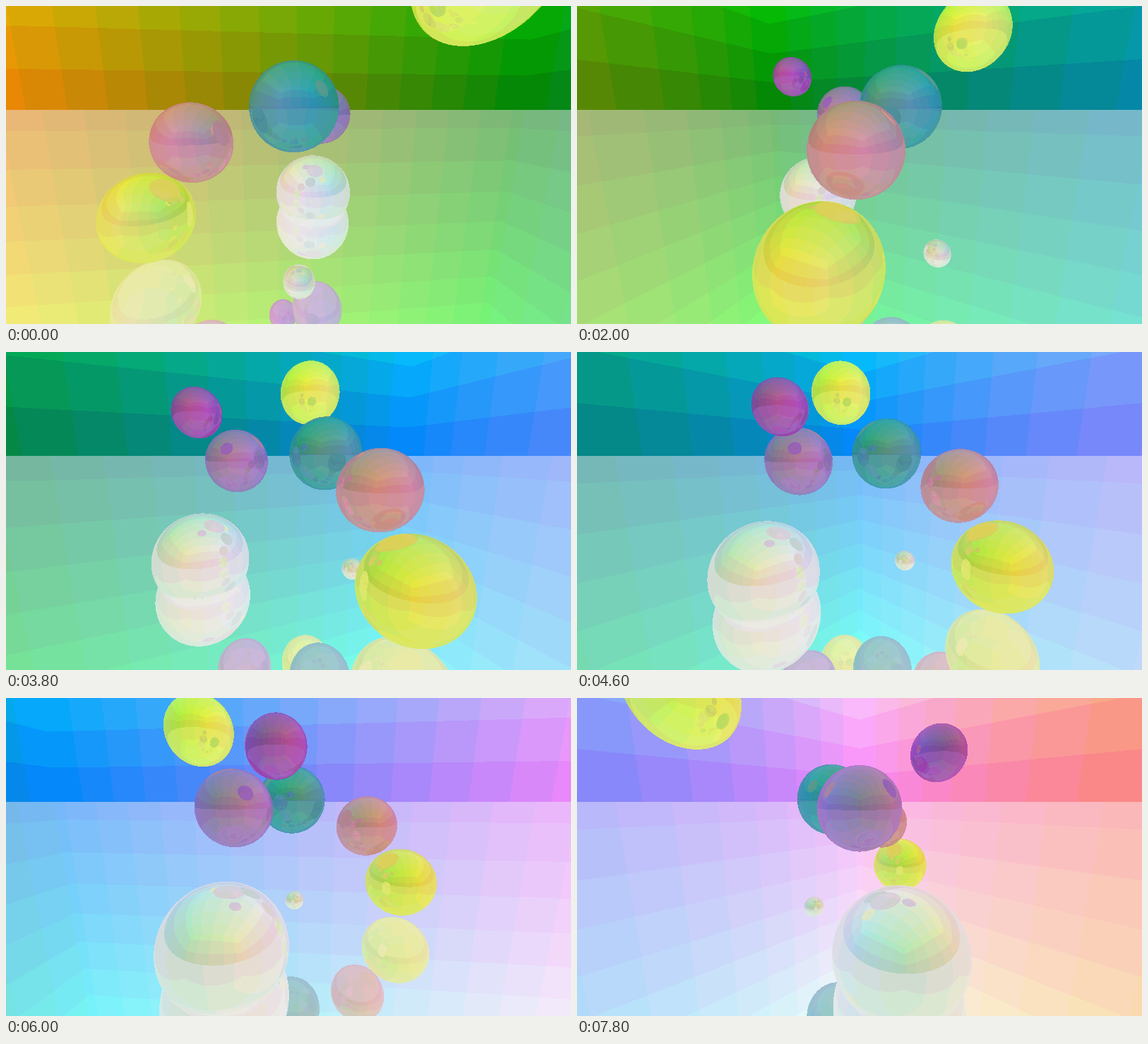
An HTML page with a canvas for the animation above (8000 ms loop, 800 by 450 pixels).

```html
<!DOCTYPE html>
<html lang="en">
<head>
<meta charset="utf-8">
<title>Mirror spheres</title>
<style>
  html, body { margin: 0; width: 100%; height: 100%; overflow: hidden; background: #000; }
  canvas { display: block; width: 800px; height: 450px; }
</style>
</head>
<body>
<canvas id="stage" width="800" height="450"></canvas>
<script>
const W = 800, H = 450, LOOP = 8000, STEP = 200;
const TURN = 2 * Math.PI / 12800;       // camera orbit, radians per ms
const FOCAL = 389.7, PITCH = Math.atan(0.2);
const FLOOR = -0.478;                   // the camera is the origin, one unit from the orbit axis
const MAX_DEPTH = 4;
const ctx = document.getElementById('stage').getContext('2d');

// orbit: distance from the axis; near: time in ms when closest to the camera
const spheres = [
  { orbit: 0.473, near: 2355,  y: -0.326,  radius: 0.137,  color: [177, 183, 62] },
  { orbit: 0.337, near: 2050,  y: -0.097,  radius: 0.1185, color: [160, 103, 116] },
  { orbit: 0.150, near: -220,  y: 0.006,   radius: 0.1345, color: [40, 111, 125] },
  { orbit: 0.215, near: 7800,  y: -0.021,  radius: 0.1185, color: [122, 84, 146] },
  { orbit: 0.302, near: 6200,  y: 0.128,   radius: 0.0745, color: [122, 46, 140] },
  { orbit: 0.528, near: -2170, y: 0.314,   radius: 0.152,  color: [177, 190, 64] },
  { orbit: 0.338, near: 7140,  y: -0.399,  radius: 0.181,  color: [181, 181, 180] },
  { orbit: 0.299, near: -205,  y: FLOOR,   radius: 0.0455, color: [172, 172, 158] }
];

let cosYaw, sinYaw;
let red, green, blue;                   // result of the latest trace

function placeScene(time) {
  const yaw = TURN * (time - 3000);
  cosYaw = Math.cos(yaw);
  sinYaw = Math.sin(yaw);
  for (const s of spheres) {
    const angle = TURN * (time - s.near);
    s.x = s.orbit * Math.sin(angle);
    s.z = 1 - s.orbit * Math.cos(angle);
  }
}

// The surroundings are a colour cube: position on its wall gives red, green and blue.
function sky(dx, dy, dz) {
  const wx = dx * sinYaw - dz * cosYaw;
  const wz = dx * cosYaw + dz * sinYaw;
  const scale = 127.5 / Math.max(Math.abs(wx), Math.abs(dy), Math.abs(wz));
  red = 127.5 + wx * scale;
  green = 127.5 + dy * scale;
  blue = 127.5 + wz * scale;
}

function blend(color, share) {
  red = color[0] + share * red;
  green = color[1] + share * green;
  blue = color[2] + share * blue;
}

const floorColor = [120, 120, 120];

// Follows a unit ray and returns what it met first.
function trace(ox, oy, oz, dx, dy, dz, depth) {
  if (depth >= MAX_DEPTH) {
    sky(dx, Math.abs(dy), dz);
    return 'sky';
  }
  let dist = dy < 0 ? (FLOOR - oy) / dy : Infinity;
  let hit = null;
  for (let i = 0; i < spheres.length; i++) {
    const s = spheres[i];
    const cx = s.x - ox, cy = s.y - oy, cz = s.z - oz;
    const along = cx * dx + cy * dy + cz * dz;
    if (along <= 0) continue;
    const disc = along * along - cx * cx - cy * cy - cz * cz + s.radius * s.radius;
    if (disc <= 0) continue;
    const t = along - Math.sqrt(disc);
    if (t > 1e-4 && t < dist) {
      dist = t;
      hit = s;
    }
  }
  if (dist === Infinity) {
    sky(dx, dy, dz);
    return 'sky';
  }
  const px = ox + dx * dist, py = oy + dy * dist, pz = oz + dz * dist;
  if (!hit) {
    trace(px, FLOOR + 1e-6, pz, dx, -dy, dz, depth + 1);
    blend(floorColor, 0.5);
    return 'floor';
  }
  const nx = (px - hit.x) / hit.radius;
  const ny = (py - hit.y) / hit.radius;
  const nz = (pz - hit.z) / hit.radius;
  const k = 2 * (dx * nx + dy * ny + dz * nz);
  trace(px, py, pz, dx - k * nx, dy - k * ny, dz - k * nz, depth + 1);
  blend(hit.color, 0.2);
  return 'sphere';
}

// Each kind of surface has its own coarse colour steps, which form the facets.
const tone = {
  sky: v => 127.5 + 16.3 * (Math.floor((v - 127.5) / 16.3) + 0.5),
  floor: v => 184 + 8.3 * Math.round((v - 184) / 8.3),
  sphere: v => 11 * Math.round(v / 11)
};

function render(time) {
  placeScene(time);
  const image = ctx.createImageData(W, H), data = image.data;
  const cp = Math.cos(PITCH), sp = Math.sin(PITCH);
  let p = 0;
  for (let row = 0; row < H; row++) {
    const v = (H / 2 - row - 0.5) / FOCAL;
    const up = v * cp - sp, ahead = v * sp + cp;
    for (let col = 0; col < W; col++) {
      const u = (col + 0.5 - W / 2) / FOCAL;
      const n = 1 / Math.sqrt(u * u + v * v + 1);
      const quantize = tone[trace(0, 0, 0, u * n, up * n, ahead * n, 0)];
      data[p++] = quantize(red);
      data[p++] = quantize(green);
      data[p++] = quantize(blue);
      data[p++] = 255;
    }
  }
  return image;
}

const count = LOOP / STEP, images = [];
const imageAt = i => images[i] || (images[i] = render(i * STEP));

function play() {
  const index = Math.floor(performance.now() % LOOP / STEP);
  ctx.putImageData(imageAt(index), 0, 0);
  imageAt((index + 1) % count);         // ready before it is due
  requestAnimationFrame(play);
}
play();
</script>
</body>
</html>
```
